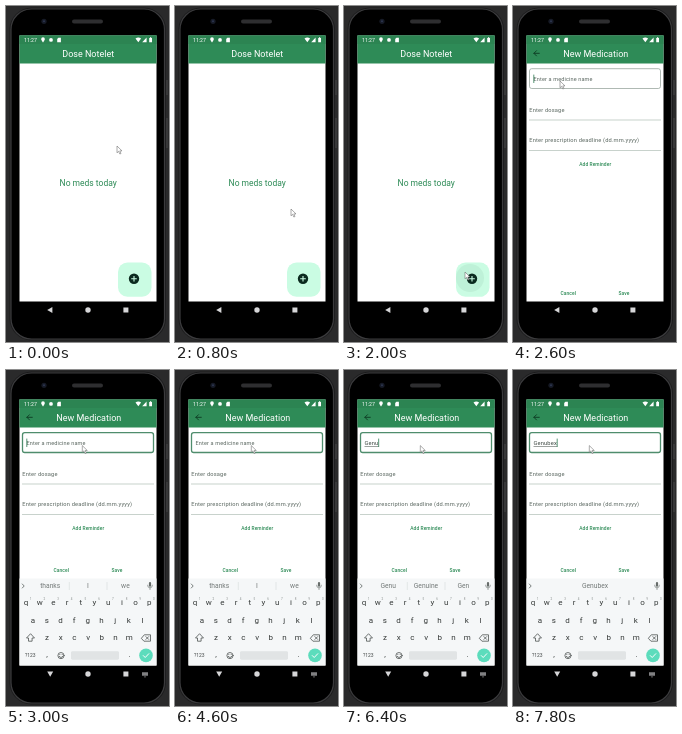
An HTML page that plays this animation: 163 px wide and 336 px high, repeating every 8 s.

```html
<!DOCTYPE html>
<html lang="en">
<head>
<meta charset="utf-8">
<title>Medication form</title>
<style>
  html, body { margin: 0; width: 100%; height: 100%; overflow: hidden; background: #2a2a2b; }
  svg { display: block; width: 100vw; height: 100vh; font-family: Roboto, "Noto Sans", sans-serif; }
  .mid { text-anchor: middle; }
  .title { font-size: 9px; fill: #fff; }
  .hint { font-size: 5.7px; letter-spacing: .17px; fill: #58655e; }
  .action { font-size: 4.9px; font-weight: 500; letter-spacing: .08px; fill: #2e8b57; }
  .line { fill: none; stroke-linecap: round; stroke-linejoin: round; }
  .key { font-size: 8px; fill: #363a39; }
  .digit { font-size: 3px; fill: #858b89; }
  .suggestion { font-size: 6.7px; fill: #737978; }
</style>
</head>
<body>
<svg viewBox="0 0 163 336">
  <defs><clipPath id="screen"><rect x="13.5" y="29.5" width="137" height="266"/></clipPath></defs>

  <!-- phone -->
  <rect width="163" height="336" fill="#2a2a2b"/>
  <path d="M161 74v15M161 112v30" stroke="#3f3f41" stroke-width="1.4"/>
  <rect x="3.5" y="1.5" width="156.5" height="333" rx="22" fill="#1c1c1d"/>
  <rect x="5" y="3" width="153.5" height="330" rx="20.5" fill="#000" stroke="#3b3b3d" stroke-width="1.2"/>
  <rect x="66" y="13.5" width="31" height="4" rx="2" fill="#2e2e30"/>
  <circle cx="38" cy="15.3" r="2.6" fill="#161a26"/>
  <circle cx="38" cy="15.3" r="1" fill="#2d3650"/>

  <g clip-path="url(#screen)">
    <rect x="13" y="29" width="138" height="267" fill="#fff"/>
    <rect x="13" y="29" width="138" height="28.5" fill="#2e8b57"/>
    <rect x="13" y="29" width="138" height="9" fill="#2c8452"/>
    <text x="18" y="35.8" font-size="5.2" fill="#fff">11:27</text>
    <g fill="#fff">
      <path d="M37 36.4C35.6 34.6 35.2 34 35.2 33.1a1.8 1.8 0 0 1 3.6 0C38.8 34 38.4 34.6 37 36.4Z"/>
      <circle cx="45" cy="33.9" r="1.9"/>
      <path d="M51.2 33l1.2-1.3h2.5v4.5h-3.7Z"/>
      <path d="M129.5 32.6q2.8-2 5.6 0l-2.8 3.6ZM140.6 31.5v4.7h-4.4ZM143.2 31.9h.8v-.6h1.2v.6h.8v4.4h-2.8Z"/>
    </g>

    <g id="home">
      <text class="title mid" x="82.2" y="50.6">Dose Notelet</text>
      <text class="mid" x="82.2" y="179.5" font-size="8.5" fill="#2e8b57">No meds today</text>
      <rect x="112" y="256.5" width="33.5" height="34.3" rx="9.5" fill="#cafce3"/>
      <circle id="ripple" cx="126" cy="272" r="14" fill="#0c4a2c" opacity=".06"/>
      <circle cx="128" cy="272.8" r="5.2" fill="#0b2a1f"/>
      <path d="M128 270v5.6M125.2 272.8h5.6" stroke="#cafce3" stroke-width="1.1"/>
    </g>

    <g id="form">
      <path class="line" d="M26.3 47.3h-5.4m2.6-2.6l-2.6 2.6l2.6 2.6" stroke="#0d3a23" stroke-width=".9"/>
      <text class="title mid" x="82.8" y="50.6">New Medication</text>
      <rect id="field" x="16.5" y="62.7" width="131" height="19.8" rx="2.2" fill="none"/>
      <text class="hint" id="nameHint" x="20.5" y="74.8" style="font-size:5.5px;letter-spacing:.15px">Enter a medicine name</text>
      <text class="hint" id="typed" x="20.5" y="74.8" style="fill:#3a453f"></text>
      <path id="underline" stroke="#3a453f" stroke-width=".5"/>
      <path id="caret" stroke="#2e7a54" stroke-width=".8"/>
      <text class="hint" x="16.3" y="105.8">Enter dosage</text>
      <text class="hint" x="16.3" y="136.4">Enter prescription deadline (dd.mm.yyyy)</text>
      <path d="M16 114h132M16 144.5h132" stroke="#b1bfb7" stroke-width=".7"/>
      <text class="action mid" x="82.2" y="160">Add Reminder</text>
      <g id="buttons">
        <text class="action mid" x="55.3" y="289">Cancel</text>
        <text class="action mid" x="111" y="289">Save</text>
      </g>
    </g>

    <g id="keyboard">
      <rect x="13" y="208.5" width="138" height="88" fill="#f5f7f8"/>
      <path class="line" d="M16.3 214l1.9 2l-1.9 2" stroke="#59605e" stroke-width=".8"/>
      <path id="dividers" d="M63.3 212v8M101 212v8" stroke="#d6dbda" stroke-width=".6"/>
      <g id="suggestions"></g>
      <rect x="142.9" y="212" width="2.2" height="4.8" rx="1.1" fill="#666c6a"/>
      <path class="line" d="M141.6 215.2a2.4 2.7 0 0 0 4.8 0M144 218v1.6" stroke="#666c6a" stroke-width=".6"/>
      <g id="keys"></g>
      <g class="line" stroke="#454a49" stroke-width=".75">
        <path d="M24.3 264l-3.8 4h2v3.2h3.6V268h2Z"/>
        <path d="M135.6 268l2.7-3.2h6.2v6.4h-6.2ZM139.9 266.6l2.8 2.8m0-2.8l-2.8 2.8"/>
        <circle cx="55" cy="285.6" r="3.1"/>
        <path d="M53.2 286.3a2 2 0 0 0 3.6 0M53.8 284.5v.1M56.2 284.5v.1"/>
      </g>
      <text class="mid" x="24.3" y="287.3" font-size="5" fill="#454a49">?123</text>
      <rect x="65" y="281.3" width="48" height="8.4" rx="1.4" fill="#e1e4e5"/>
      <circle cx="140" cy="285.4" r="6.8" fill="#5cdcbc"/>
      <path class="line" d="M137.3 285.6l1.9 1.9l3.6-3.8" stroke="#fff"/>
    </g>
  </g>

  <!-- navigation -->
  <g fill="#d6d6d8">
    <path id="back"/>
    <circle cx="82" cy="304" r="2.7"/>
    <rect x="117.4" y="301.5" width="5" height="5"/>
    <path id="switcher" d="M136 302.2h6v3.6h-6ZM137.7 306.5h2.6l-1.3 1.3Z" opacity=".6"/>
  </g>
  <path id="pointer" d="M0 0v6.8l1.6-1.5l1.2 2.7l1.2-.5l-1.2-2.6h2.2Z" fill="#fff" stroke="#666" stroke-width=".55"/>
</svg>

<script>
const LOOP = 8000, STEP = 200;
const $ = id => document.getElementById(id);
const set = (id, attrs) => Object.entries(attrs).forEach(([k, v]) => $(id).setAttribute(k, v));
const show = (id, on) => set(id, { visibility: on ? 'visible' : 'hidden' });
const label = (kind, x, y, text) => `<text class="${kind} mid" x="${x}" y="${y}">${text}</text>`;
const latest = (list, t) => list.filter(item => item[0] <= t).pop();

const rows = [['qwertyuiop', 20, 235.3], ['asdfghjkl', 27, 253], ['zxcvbnm', 41, 270.4]];
$('keys').innerHTML = rows.map(([letters, x, y], row) => [...letters].map((c, i) => {
  const cx = x + 13.7 * i;
  return label('key', cx, y, c) + (row ? '' : label('digit', cx + 4.6, y - 5.2, (i + 1) % 10));
}).join('')).join('') + label('key', 41, 287, ',') + label('key', 123.5, 287, '.');

// time, typed text, suggestions
const typing = [
  [0, '', ['thanks', 'I', 'we']],
  [5200, 'G', ['G', 'Genuine', 'Gen']],
  [6000, 'Ge', ['Ge', 'Genuine', 'Gen']],
  [6400, 'Genu', ['Genu', 'Genuine', 'Gen']],
  [6800, 'Genub', ['Genub', 'Genubex', 'Gen']],
  [7200, 'Genube', ['', 'Genubex', '']],
  [7400, 'Genubex', ['', 'Genubex', '']]
];

// time, pointer tip
const path = [
  [0, 111, 140], [200, 111, 140], [1400, 121, 266], [2000, 121, 266],
  [2600, 47, 75], [3000, 76.3, 75.6], [LOOP, 76.3, 75.6]
];

function pointerAt(t) {
  const i = path.findIndex(p => p[0] > t);
  const [t0, x0, y0] = path[i - 1], [t1, x1, y1] = path[i];
  const u = (t - t0) / (t1 - t0), k = u * u * (3 - 2 * u);
  return `translate(${x0 + (x1 - x0) * k} ${y0 + (y1 - y0) * k})`;
}

function draw(t) {
  const formOpen = t >= 2200, focused = t >= 2600, raised = t >= 2800;
  const [, text, words] = latest(typing, t);
  show('home', !formOpen);
  show('form', formOpen);
  show('ripple', t === 2000);
  set('pointer', { transform: pointerAt(t) });

  set('field', raised ? { stroke: '#4f8d6d', 'stroke-width': 1.3 } : { stroke: '#8d9b93', 'stroke-width': .7 });
  show('nameHint', formOpen && !text);
  $('typed').textContent = text;
  const end = 20.8 + (text ? $('typed').getComputedTextLength() : 0);
  set('underline', { d: text ? `M20.5 76.5H${end}` : 'M0 0' });
  set('caret', { d: `M${end} 68.6v8.4` });
  show('caret', focused && (text || t < 3000 || t % 1000 < 500));

  set('buttons', { transform: `translate(0 ${raised ? -87 : 0})` });
  show('keyboard', raised);
  show('switcher', raised);
  set('keyboard', { transform: `translate(0 ${t < 3000 ? 40 : 0})` });
  show('dividers', raised && words[0]);
  $('suggestions').innerHTML = words.map((w, i) => label('suggestion', [44.2, 82, 119.4][i], 218.3, w)).join('');
  set('back', { d: raised ? 'M41.2 301.6h6l-3 5.2Z' : 'M46.4 301v6l-5.2-3Z' });
}

let last = -1;
function frame(now) {
  const t = Math.floor(now % LOOP / STEP) * STEP;
  if (t !== last) draw(last = t);
  requestAnimationFrame(frame);
}
draw(0);
requestAnimationFrame(frame);
</script>
</body>
</html>
```
